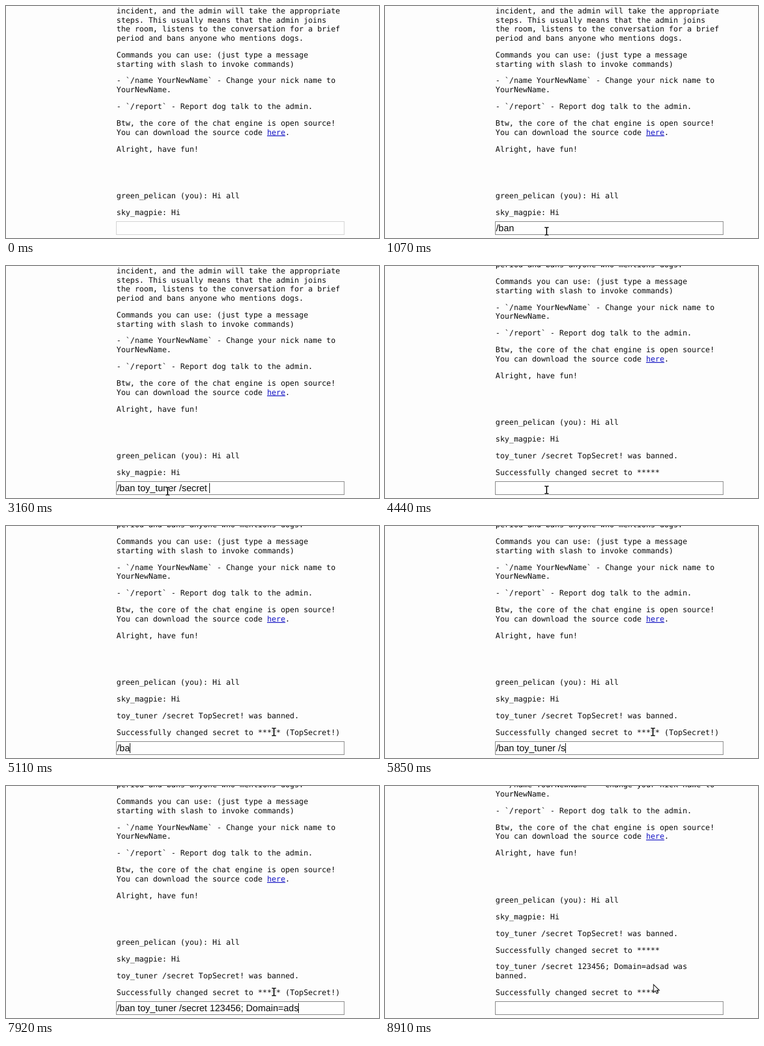
An HTML page for the animation above (8.97 s loop, 600 by 374 pixels).

```html
<!DOCTYPE html>
<html lang="en">
<head>
<meta charset="utf-8">
<title>Chat</title>
<style>
  html, body { margin: 0; width: 100%; height: 100%; overflow: hidden; background: #fdfdfd; }
  svg { display: block; width: 600px; height: 374px; }
  text { white-space: pre; text-rendering: geometricPrecision; fill: #0a0a0a; }
  .chat { font: 12.19px "DejaVu Sans Mono", monospace; }
  .entry { font: 15px "Liberation Sans", Arial, sans-serif; }
  .link { fill: #1212c4; text-decoration: underline; }
</style>
</head>
<body>
<svg id="stage" viewBox="0 0 600 374">
  <g id="chat" class="chat"></g>
  <rect id="box" x="177.5" y="347.5" width="366.5" height="21" fill="#fefefe"/>
  <text id="entry" class="entry" x="178.4" y="363.3"></text>
  <rect id="caret" y="350" width="1" height="16" fill="#111"/>
  <g id="pointer">
    <g id="beam" fill="none" stroke-linecap="square">
      <path d="M-2.5 -6H-1L0 -5L1 -6H2.5M0 -5V5M-2.5 6H-1L0 5L1 6H2.5" stroke="#fff" stroke-width="3.2"/>
      <path d="M-2.5 -6H-1L0 -5L1 -6H2.5M0 -5V5M-2.5 6H-1L0 5L1 6H2.5" stroke="#111" stroke-width="1.7"/>
    </g>
    <path id="arrow" d="M0 0V12.8L3 10.1L5.1 14.6L7.2 13.7L5.2 9.3H9.2Z" fill="#fff" stroke="#1a1a1a" stroke-width="1.1"/>
  </g>
</svg>
<script>
const LOOP = 8970;
const LEFT = 177.8, BOTTOM = 337.1, CHAR = 7.34;
const LINE = 14.71, PARA = 26.9, BREAK = 75.6;
const FOCUS = 420, SENDS = [4440, 8250];
const NICK = "toy_tuner";
const SECRET = "Successfully changed secret to *****", REVEAL = " (TopSecret!)";

// [text, distance from the line above, time of arrival]
const lines = [
  ["incident, and the admin will take the appropriate", LINE],
  ["steps. This usually means that the admin joins", LINE],
  ["the room, listens to the conversation for a brief", LINE],
  ["period and bans anyone who mentions dogs.", LINE],
  ["Commands you can use: (just type a message", PARA],
  ["starting with slash to invoke commands)", LINE],
  ["- `/name YourNewName` - Change your nick name to", PARA],
  ["YourNewName.", LINE],
  ["- `/report` - Report dog talk to the admin.", PARA],
  ["Btw, the core of the chat engine is open source!", PARA],
  ["You can download the source code here.", LINE],
  ["Alright, have fun!", PARA],
  ["green_pelican (you): Hi all", BREAK],
  ["sky_magpie: Hi", PARA],
  [NICK + " /secret TopSecret! was banned.", PARA, SENDS[0]],
  [SECRET, PARA, SENDS[0]],
  [NICK + " /secret 123456; Domain=adsad was", PARA, SENDS[1]],
  ["banned.", LINE, SENDS[1]],
  [SECRET, PARA, SENDS[1]]
].map(([text, gap, from = 0]) => ({ text, gap, from }));

// [text, first key, last key]
const typing = [
  ["/ban", 600, 870],
  [" " + NICK, 1670, 2540],
  [" /secret ", 2670, 3160],
  ["TopSecret!", 3560, 4240],
  ["/ban " + NICK + " /secret ", 5000, 6150],
  ["123456", 6540, 6780],
  ["; Domain", 7110, 7410],
  ["=adsad", 7610, 8050]
];

// [time, x, y]
const path = [
  [60, 268, 388], [FOCUS, 260, 363], [4240, 260, 363], [4400, 260, 361],
  [4480, 260, 361], [4960, 431, 332], [8250, 431, 332], [8910, 432, 320]
];

const $ = id => document.getElementById(id);
const show = (el, on) => el.setAttribute("visibility", on ? "visible" : "hidden");

function add(parent, tag, text, cls) {
  const el = document.createElementNS("http://www.w3.org/2000/svg", tag);
  el.textContent = text;
  if (cls) el.setAttribute("class", cls);
  return parent.appendChild(el);
}

for (const line of lines) {
  const [head, tail] = line.text.split(/here(?=\.$)/);
  line.el = add($("chat"), "text", head);
  line.el.setAttribute("x", LEFT);
  if (tail) {
    add(line.el, "tspan", "here", "link");
    add(line.el, "tspan", tail);
  }
  if (line.text === SECRET) line.reveal = add(line.el, "tspan", REVEAL);
}

function pointerAt(t) {
  const i = path.findIndex(p => p[0] > t);
  if (i === 0) return path[0].slice(1);
  if (i < 0) return path[path.length - 1].slice(1);
  const [t0, x0, y0] = path[i - 1], [t1, x1, y1] = path[i];
  const u = (t - t0) / (t1 - t0), k = u * u * (3 - 2 * u);
  return [x0 + (x1 - x0) * k, y0 + (y1 - y0) * k];
}

function entryAt(t) {
  const cleared = Math.max(0, ...SENDS.filter(s => s <= t));
  let text = "", lastKey = 0;
  for (const [str, start, end] of typing) {
    if (start < cleared || start > t) continue;
    const step = (end - start) / (str.length - 1);
    const n = Math.min(str.length, Math.floor((t - start) / step + 1e-6) + 1);
    text += str.slice(0, n);
    lastKey = start + (n - 1) * step;
  }
  return { text, idle: t - lastKey };
}

function drawChat(t, px, py) {
  let y = BOTTOM, overText = false;
  for (const line of [...lines].reverse()) {
    const on = t >= line.from;
    show(line.el, on);
    if (line.reveal) show(line.reveal, false);
    if (!on) continue;
    line.el.setAttribute("y", y);
    const over = py > y - 11.3 && py < y + 3.5 &&
      px > LEFT && px < LEFT + line.text.length * CHAR;
    if (over && line.reveal) show(line.reveal, true);
    overText = overText || over;
    y -= line.gap;
  }
  return overText;
}

function drawEntry(t) {
  const { text, idle } = entryAt(t);
  const entry = $("entry");
  $("box").setAttribute("stroke", t < FOCUS ? "#d2d2d2" : "#858585");
  if (entry.textContent !== text) entry.textContent = text;
  const lit = idle < 190 || (idle - 190) % 1000 >= 500;
  show($("caret"), text && lit);
  if (text) $("caret").setAttribute("x", Math.floor(178.4 + entry.getComputedTextLength()));
}

function draw(t) {
  const [px, py] = pointerAt(t);
  const overText = drawChat(t, px, py);
  drawEntry(t);
  const overBox = py > 347 && py < 369;
  $("pointer").setAttribute("transform", `translate(${px} ${py})`);
  show($("beam"), overText || overBox);
  show($("arrow"), !(overText || overBox));
}

const began = performance.now();
function tick() {
  draw((performance.now() - began) % LOOP);
  requestAnimationFrame(tick);
}
tick();
</script>
</body>
</html>
```
